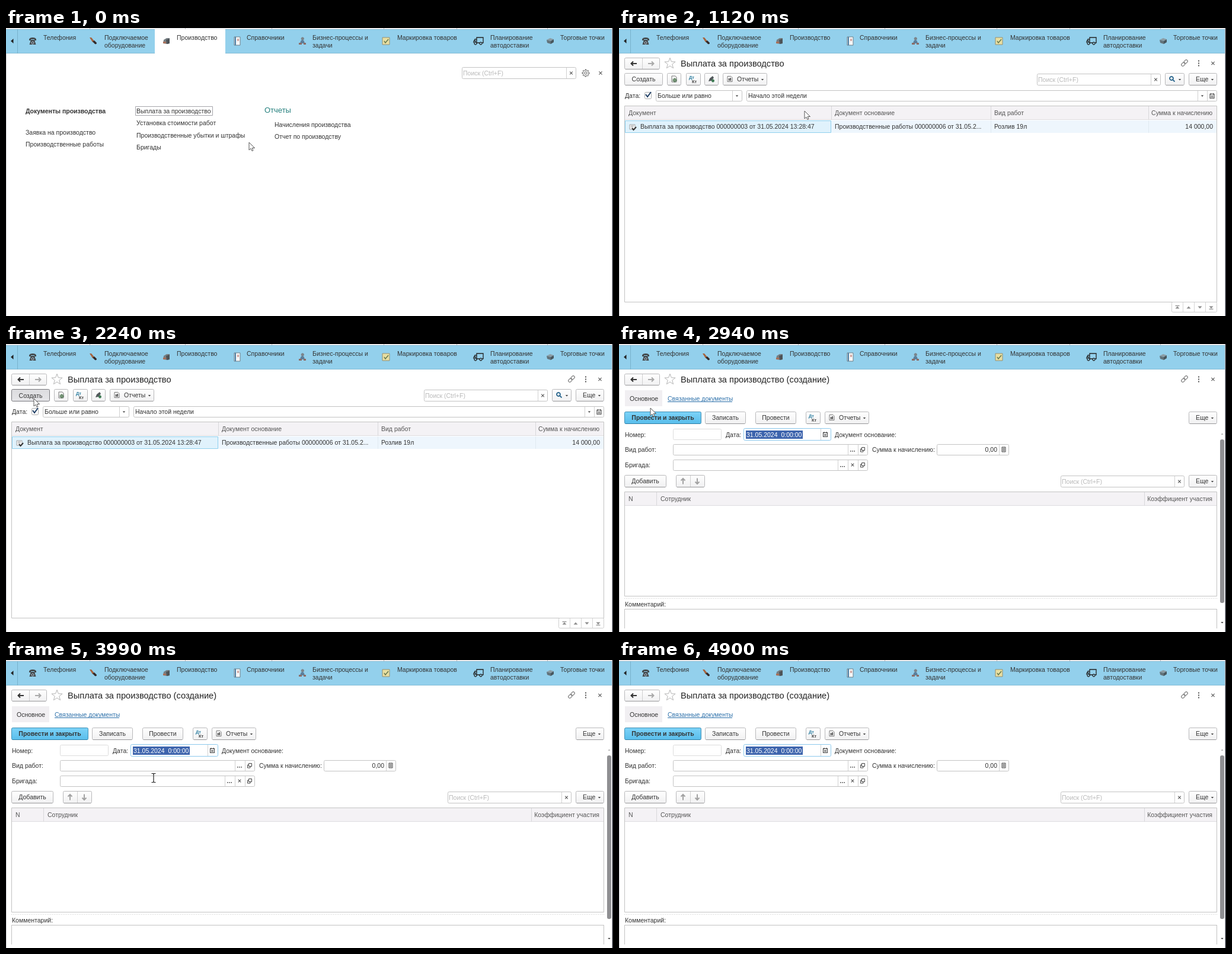
An HTML page with a canvas that plays this animation: 1024x486 px, repeating every 5320 ms.

```html
<!DOCTYPE html>
<html lang="ru">
<head>
<meta charset="utf-8">
<style>
  html, body { margin: 0; width: 100%; height: 100%; overflow: hidden; background: #fff; }
  canvas { display: block; }
</style>
</head>
<body>
<canvas width="1024" height="486"></canvas>
<script>
const ctx = document.querySelector('canvas').getContext('2d');
const LOOP = 5320, STEP = 70;
const LIST_AT = 1120, PRESS_AT = 2240, FORM_AT = 2310;
const INK = '#333', EDGE = '#c3c3c3', BLUE = '#93d0ec';

// ---- primitives ----
function text(s, x, y, { size = 10.5, color = INK, bold = false, align = 'left' } = {}) {
  ctx.font = `${bold ? 'bold ' : ''}${size}px "Liberation Sans", Arial, sans-serif`;
  ctx.fillStyle = color;
  ctx.textAlign = align;
  ctx.fillText(s, x, y + size * 0.36);
}
function rect(x, y, x2, y2, color) {
  ctx.fillStyle = color;
  ctx.fillRect(x, y, x2 - x, y2 - y);
}
function frame(x, y, x2, y2, { fill = '#fff', edge = EDGE, r = 2 } = {}) {
  ctx.beginPath();
  ctx.roundRect(x + 0.5, y + 0.5, x2 - x - 1, y2 - y - 1, r);
  ctx.fillStyle = fill;
  ctx.fill();
  ctx.strokeStyle = edge;
  ctx.lineWidth = 1;
  ctx.stroke();
}
const vline = (x, y, y2, color = EDGE) => rect(x, y, x + 1, y2, color);
const hline = (x, x2, y, color = EDGE) => rect(x, y, x2, y + 1, color);
function shape(d, x, y, { fill, stroke, width = 1 }) {
  const path = new Path2D(d);
  ctx.save();
  ctx.translate(x, y);
  if (fill) { ctx.fillStyle = fill; ctx.fill(path); }
  if (stroke) { ctx.strokeStyle = stroke; ctx.lineWidth = width; ctx.stroke(path); }
  ctx.restore();
}

// ---- small marks, each centred on x, y ----
const cross = (x, y, s = 2.3, color = '#555') =>
  shape(`M${-s} ${-s}L${s} ${s}M${s} ${-s}L${-s} ${s}`, x, y, { stroke: color, width: 1.1 });
const caret = (x, y) => shape('M-2.2 -1H2.2L0 1.5Z', x, y, { fill: '#444' });
const dots = (x, y) => shape('M-4 2h1.6v1.6h-1.6zM-.8 2h1.6v1.6h-1.6zM2.4 2h1.6v1.6h-1.6z', x, y, { fill: '#444' });
const openIcon = (x, y) => shape('M-1.5 -3.5H3.5V1.5H-1.5ZM-1.5 -1H-3.5V4H1V1.5', x, y, { stroke: '#444' });
const calendar = (x, y) => {
  shape('M-3.5 -3H3.5V4H-3.5ZM-2 -4.5V-2M2 -4.5V-2M-2 0H2M-2 2H2', x, y, { stroke: '#444', width: 1.1 });
};
const arrowIcon = (x, y, angle, color) => {
  ctx.save();
  ctx.translate(x, y);
  ctx.rotate(angle);
  shape('M5 0H-4M-1 -3.5L-4.5 0L-1 3.5', 0, 0, { stroke: color, width: 2 });
  ctx.restore();
};
const star = (x, y, r, style) => {
  let d = '';
  for (let i = 0; i < 10; i++) {
    const a = -Math.PI / 2 + i * Math.PI / 5, k = i % 2 ? r * 0.42 : r;
    d += `${i ? 'L' : 'M'}${k * Math.cos(a)} ${k * Math.sin(a)}`;
  }
  shape(d + 'Z', x, y, style);
};
function gear(x, y, r, color) {
  let d = '';
  for (let i = 0; i <= 64; i++) {
    const a = i * Math.PI / 32, k = r + (Math.cos(a * 8) > 0 ? 0.8 : -0.8);
    d += `${i ? 'L' : 'M'}${k * Math.cos(a)} ${k * Math.sin(a)}`;
  }
  shape(d, x, y, { stroke: color });
  shape(`M${r * 0.4} 0A${r * 0.4} ${r * 0.4} 0 1 1 ${r * 0.4} -.01`, x, y, { stroke: color });
}

// ---- controls ----
function button(x, y, x2, y2, label, { primary = false, pressed = false } = {}) {
  const fill = ctx.createLinearGradient(0, y, 0, y2);
  const [top, bottom] = primary ? ['#7dd3f8', '#58bdeb'] : pressed ? ['#dcdcdf', '#e6e6e9'] : ['#fff', '#f0f0f1'];
  fill.addColorStop(0, top);
  fill.addColorStop(1, bottom);
  frame(x, y, x2, y2, { fill, edge: primary ? '#3f8fb5' : pressed ? '#77777c' : '#b8b8ba' });
  if (!pressed) hline(x + 2, x2 - 2, y2 - 1, primary ? '#2f7da3' : '#979799');
  if (label) text(label, (x + x2) / 2, (y + y2) / 2 + (pressed ? 0.5 : -0.5), { align: 'center', bold: primary });
}
function moreButton(y) {
  button(961, y, 1009, y + 21);
  text('Еще', 973, y + 10);
  caret(1001, y + 11);
}
function reportsButton(x, y) {
  button(x, y, x + 75, y + 21);
  shape('M-4 -4.5H2L4 -2.5V4.5H-4Z', x + 12, y + 10, { stroke: '#777' });
  shape('M-2 3V-1H-.5V3ZM.5 3V-2H2V3Z', x + 12, y + 10, { fill: '#333' });
  text('Отчеты', x + 24, y + 10);
  caret(x + 67, y + 11);
}
function ledgerButton(x, y) {
  button(x, y, x + 25, y + 21);
  text('Дт', x + 5, y + 7, { size: 7.5, bold: true, color: '#2b7d9f' });
  text('Кт', x + 10, y + 14, { size: 7.5, bold: true, color: '#444' });
}
function field(x, y, x2, y2, splits = [], edge = EDGE) {
  frame(x, y, x2, y2, { edge });
  splits.forEach(s => vline(s, y + 1, y2 - 1, '#d0d0d0'));
}
function search(x, y, x2) {
  field(x, y, x2, y + 20, [x2 - 17]);
  text('Поиск (Ctrl+F)', x + 2, y + 10, { color: '#b9b9b9' });
  cross(x2 - 8.5, y + 10);
}
function table(y, y2, splits) {
  frame(9, y, 1009, y2, { r: 0 });
  rect(10, y + 1, 1008, y + 23, '#f4f2f5');
  hline(10, 1008, y + 23, '#dedde0');
  splits.forEach(s => vline(s, y + 1, y + 24, '#d8d7da'));
}

// ---- section bar ----
const sections = [
  [63, 'Телефония'], [166, 'Подключаемое', 'оборудование'], [288, 'Производство'],
  [406, 'Справочники'], [517, 'Бизнес-процессы и', 'задачи'], [660, 'Маркировка товаров'],
  [817, 'Планирование', 'автодоставки'], [935, 'Торговые точки'],
];
function sectionBar(active) {
  rect(0, 0, 1022, 2, '#ececee');
  [141, 302, 448, 637, 760, 913].forEach(x => vline(x, 0, 2, '#b5b5b8'));
  rect(0, 2, 1022, 43, BLUE);
  hline(0, 1022, 2, '#84bfdb');
  hline(0, 1022, 42, '#84bcd5');
  vline(19, 2, 43, '#78b1cb');
  shape('M2.5 -4V4L-2 0Z', 10, 22, { fill: '#222' });
  if (active) rect(251, 2, 370, 43, '#fff');
  for (const [x, first, second] of sections) {
    text(first, x, 16.5);
    if (second) text(second, x, 29);
  }
  // telephone
  shape('M-6 -1V-3Q-5 -6 0 -6T6 -3V-1H3V-3H-3V-1ZM-3 -2H3L5.5 6H-5.5Z', 45, 22, { fill: '#43494c' });
  shape('M2 2A2 2 0 1 1 2 1.99', 45, 23, { stroke: '#bcd', width: 1 });
  // scanner
  shape('M-6 -6L-3 -6L2 0L-1 2Z', 147, 22, { fill: '#a5633f' });
  shape('M-1 1L2 -1L6 3Q6 6 3 5Z', 147, 22, { fill: '#332a2a' });
  // machine
  shape('M-5 -2L0 -5L5 -5V4L1 5L-6 4Z', 271, 22, { fill: '#777f84' });
  shape('M-1 -2L5 -4V4L0 5Z', 271, 22, { fill: '#4d5357' });
  shape('M-6 1H-1V4H-6Z', 271, 22, { fill: '#a8705a' });
  // notebook
  shape('M-5 -7H5V7H-5Z', 390, 22, { fill: '#f5f7f8', stroke: '#6f7e87' });
  shape('M-3 -7V7', 390, 22, { stroke: '#5183a8', width: 2 });
  shape('M0 -3H3M0 -1H3', 390, 22, { stroke: '#b05b50' });
  // person with flow
  shape('M3 -3A2.7 2.7 0 1 1 3 -3.01Z', 500, 21, { fill: '#7c858b' });
  shape('M-4 5Q-3 -1 0 -1T4 5Z', 500, 21, { fill: '#5b7f9c' });
  shape('M-6 4H-1V7H-6ZM2 4H6V7H2Z', 500, 21, { fill: '#8b6d68' });
  // checked sheet
  shape('M-6 -6H6V6H-6Z', 641, 22, { fill: '#e8dfa2', stroke: '#948f70' });
  shape('M-3 0L-1 3L4 -3', 641, 22, { stroke: '#66794e', width: 1.5 });
  // truck
  shape('M-8 3V1L-6 -3H-3V-6H8V3H6M-3 -3V3H2M-8 0H-4', 797, 22, { stroke: '#222', width: 1.3 });
  shape('M-3 4A2 2 0 1 1 -3 3.99M6 4A2 2 0 1 1 6 3.99', 797, 22, { stroke: '#222', width: 1.3 });
  // box
  shape('M-6 -2L0 -5L6 -3L1 0Z', 918, 22, { fill: '#8b9da5' });
  shape('M-6 -2L1 0V5L-5 3Z', 918, 22, { fill: '#62737b' });
  shape('M1 0L6 -3V2L1 5Z', 918, 22, { fill: '#48575e' });
}

// ---- screens ----
function menuScreen(hover) {
  search(769, 66, 962);
  gear(978, 76, 5.3, '#555');
  cross(1003, 76, 2.6);
  text('Документы производства', 33, 140, { bold: true });
  text('Заявка на производство', 33, 176);
  text('Производственные работы', 33, 196);
  frame(218, 132, 349, 148, { edge: '#a5a5ab', r: 0 });
  ['Выплата за производство', 'Установка стоимости работ', 'Производственные убытки и штрафы', 'Бригады']
    .forEach((s, i) => text(s, 220, 140.3 + i * 20.3));
  if (hover) {
    hline(220, 347, 145, INK);
    star(210, 140, 5, { fill: '#8c8c8f' });
  }
  text('Отчеты', 436, 138, { size: 13, color: '#25807e' });
  text('Начисления производства', 453, 163);
  text('Отчет по производству', 453, 183.5);
}
function windowHeader(title) {
  button(9, 50, 69, 70);
  vline(39, 51, 69, '#cfcfcf');
  arrowIcon(25, 60, 0, '#333');
  arrowIcon(54, 60, Math.PI, '#a9a9a9');
  star(86, 60, 9.5, { stroke: '#b4b4b4' });
  text(title, 104, 60, { size: 14.6, color: '#222' });
  ctx.save();
  ctx.translate(954, 59);
  ctx.rotate(-Math.PI / 4);
  ctx.strokeStyle = '#777';
  ctx.lineWidth = 1.1;
  ctx.beginPath();
  ctx.roundRect(-6.5, -2.3, 7, 4.6, 2.3);
  ctx.roundRect(-0.5, -2.3, 7, 4.6, 2.3);
  ctx.stroke();
  ctx.restore();
  [-4, 0, 4].forEach(d => rect(977, 58.5 + d, 979, 60.5 + d, '#555'));
  cross(1002, 59.5, 2.6);
}
function listScreen(pressed) {
  windowHeader('Выплата за производство');
  button(9, 76, 74, 97, 'Создать', { pressed });
  button(81, 76, 105, 97);
  shape('M-4 -5H2L4 -3V5H-4Z', 93, 86, { stroke: '#777' });
  gear(94, 88, 2.5, '#48724a');
  ledgerButton(113, 76);
  button(144, 76, 168, 97);
  shape('M-5 4L-3 -1L2 -5L4 -2L0 3Z', 156, 86, { fill: '#53595c' });
  shape('M5 3A2.5 2.5 0 1 1 5 2.99Z', 156, 86, { fill: '#3f7c54' });
  reportsButton(175, 76);
  search(705, 77, 914);
  button(921, 76, 954, 97);
  shape('M2 -1A3 3 0 1 1 2 -1.01M1 1.2L4.5 4.5', 933, 86, { stroke: '#27648c', width: 1.8 });
  caret(946, 87);
  moreButton(76);

  text('Дата:', 10, 114);
  frame(43, 108, 55, 120, { edge: '#aaa' });
  shape('M-4 -1L-1 3L5 -5', 49, 113, { stroke: '#1f3f66', width: 2 });
  field(62, 105, 208, 124, [191]);
  text('Больше или равно', 65, 114.5);
  caret(199, 114.5);
  field(215, 105, 1009, 124, [976, 992]);
  text('Начало этой недели', 218, 114.5);
  caret(984, 114.5);
  calendar(1000.5, 114.5);

  table(131, 463, [358, 627, 893]);
  text('Документ', 16, 143, { color: '#555' });
  text('Документ основание', 364, 143, { color: '#555' });
  text('Вид работ', 633, 143, { color: '#555' });
  text('Сумма к начислению', 1001, 143, { color: '#555', align: 'right' });
  rect(358, 156, 1008, 177, '#eef6fd');
  [627, 893].forEach(x => vline(x, 156, 177, '#e0e9f0'));
  frame(10, 156, 358, 177, { fill: '#e0f2fc', edge: '#8fd0ee', r: 0 });
  shape('M-5 -4H4V4H-5ZM-3 -2H2M-3 0H1', 23, 167, { fill: '#f5f5f5', stroke: '#a0a4a6' });
  shape('M-1 2L1.5 5L6 0', 23, 167, { stroke: '#333', width: 2 });
  text('Выплата за производство 000000003 от 31.05.2024 13:28:47', 36, 166.5);
  text('Производственные работы 000000006 от 31.05.2...', 364, 166.5);
  text('Розлив 19л', 633, 166.5);
  text('14 000,00', 1002, 166.5, { align: 'right' });

  frame(932, 462, 1009, 480, { edge: '#cfcfcf' });
  [951, 970, 989].forEach(x => vline(x, 463, 479, '#d4d4d4'));
  const up = 'M-3.5 2H3.5L0 -2Z', down = 'M-3.5 -2H3.5L0 2Z', gray = { fill: '#8e8e8e' };
  shape(up + 'M-3.5 -3.5H3.5V-2.3H-3.5Z', 942, 471.5, gray);
  shape(up, 961, 471.5, gray);
  shape(down, 980, 471.5, gray);
  shape(down + 'M-3.5 2.3H3.5V3.5H-3.5Z', 999, 471.5, gray);
}
function formScreen() {
  windowHeader('Выплата за производство (создание)');
  rect(10, 78, 73, 105, '#f1eff2');
  text('Основное', 18, 92);
  text('Связанные документы', 82, 92, { color: '#2f72ab' });
  hline(82, 191, 97, '#2f72ab');

  button(9, 114, 139, 135, 'Провести и закрыть', { primary: true });
  button(145, 114, 214, 135, 'Записать');
  button(230, 114, 299, 135, 'Провести');
  ledgerButton(315, 114);
  reportsButton(347, 114);
  moreButton(114);

  text('Номер:', 10, 153);
  field(91, 143, 173, 162, [], '#dcdcdc');
  text('Дата:', 180, 153);
  field(210, 142, 358, 163, [340], '#8cc9ec');
  rect(214, 146, 310, 160, '#3d64ad');
  text('31.05.2024  0:00:00', 215, 153, { color: '#fff' });
  calendar(348, 152.5);
  text('Документ основание:', 364, 153);

  text('Вид работ:', 10, 178.5);
  field(91, 169, 420, 188, [386, 403]);
  dots(394, 178);
  openIcon(411, 178);
  text('Сумма к начислению:', 427, 178.5);
  field(536, 169, 658, 188, [641]);
  text('0,00', 638, 178.5, { align: 'right' });
  shape('M-3 -4H3V4H-3ZM-2 -2H2M-2 0H2M-2 2H2', 649, 178, { stroke: '#444' });

  text('Бригада:', 10, 204.5);
  field(91, 195, 420, 214, [369, 386, 403]);
  dots(377, 204);
  cross(394, 204);
  openIcon(411, 204);

  button(9, 221, 80, 242, 'Добавить');
  button(96, 221, 145, 242);
  vline(120, 222, 241, '#cfcfcf');
  arrowIcon(108, 231.5, Math.PI / 2, '#a2a2a2');
  arrowIcon(132, 231.5, -Math.PI / 2, '#a2a2a2');
  search(745, 222, 954);
  moreButton(221);

  table(249, 426, [63, 886]);
  text('N', 16, 261, { color: '#555' });
  text('Сотрудник', 70, 261, { color: '#555' });
  text('Коэффициент участия', 1001, 261, { color: '#555', align: 'right' });
  for (let x = 9; x < 1009; x += 3) rect(x, 429, x + 1, 430, '#ccc');
  text('Комментарий:', 10, 439);
  hline(9, 1009, 447);
  vline(9, 447, 480);
  vline(1008, 447, 480);

  shape('M-2 1H2L0 -1.5Z', 1017.5, 152, { fill: '#b0b0b0' });
  ctx.beginPath();
  ctx.roundRect(1014, 161, 7, 276, 3);
  ctx.fillStyle = '#8f8f92';
  ctx.fill();
  caret(1017.5, 470);
}

// ---- pointer: time, x, y ----
const track = [
  [70, 410, 193], [280, 404, 192], [350, 404, 192], [490, 315, 135], [1050, 315, 135], [1120, 313, 140],
  [1470, 313, 140], [2030, 47, 92], [2660, 47, 92], [2730, 49, 98], [2870, 49, 98], [2940, 53, 108],
  [3080, 78, 132], [3150, 78, 132], [3500, 249, 199], [4200, 249, 199], [4830, 262, 492],
];
function pointerAt(t) {
  const i = track.findIndex(k => k[0] > t);
  if (i < 0) return track.at(-1).slice(1);
  if (i === 0) return track[0].slice(1);
  const [t0, x0, y0] = track[i - 1], [t1, x1, y1] = track[i];
  const p = (t - t0) / (t1 - t0), e = p * p * (3 - 2 * p);
  return [x0 + (x1 - x0) * e, y0 + (y1 - y0) * e];
}
function drawPointer(t, hover) {
  const [x, y] = pointerAt(t);
  const overField = t >= FORM_AT && x > 92 && x < 369 && ((y > 169 && y < 188) || (y > 195 && y < 214));
  if (hover) {
    shape('M-2 0Q-.5 -2 1 0V5L6 6.5Q7 7 6.5 10L5.5 13H-1L-5 8Q-5 6 -2 8.5Z', x, y, { fill: '#fff', stroke: '#444' });
    shape('M1 5V8M3.3 6V8', x, y, { stroke: '#555', width: 0.8 });
  } else if (overField) {
    shape('M-3.5 -7.5H-1L0 -6.5L1 -7.5H3.5M0 -6.5V6.5M-3.5 7.5H-1L0 6.5L1 7.5H3.5', x, y, { stroke: '#222', width: 1.2 });
  } else {
    shape('M0 0V13L3 10.3L5 14.5L7 13.6L5.2 9.5H9.5Z', x, y, { fill: '#fff', stroke: '#555' });
  }
}

function draw(now) {
  const t = Math.floor(now % LOOP / STEP) * STEP;
  const onMenu = t < LIST_AT, hover = onMenu && t >= 490;
  rect(0, 0, 1024, 486, '#fff');
  sectionBar(onMenu);
  if (onMenu) menuScreen(hover);
  else if (t < FORM_AT) listScreen(t >= PRESS_AT);
  else formScreen();
  vline(0, 43, 486, '#cfcfd2');
  drawPointer(t, hover);
  rect(1022, 0, 1023, 486, '#b9bcc2');
  rect(1023, 0, 1024, 486, '#22232b');
}
const start = performance.now();
function tick() {
  draw(performance.now() - start);
  requestAnimationFrame(tick);
}
tick();
</script>
</body>
</html>
```
